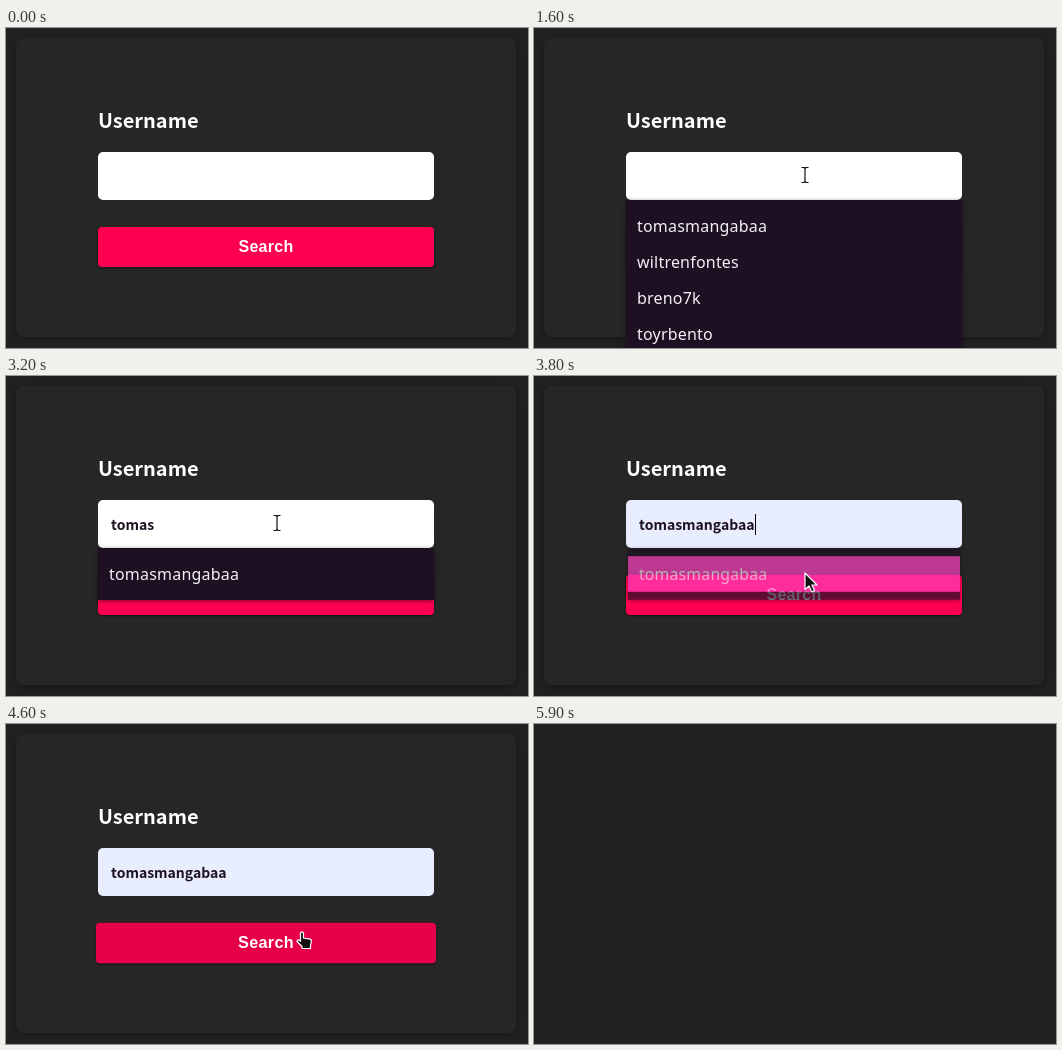
Animation of 522x320 px, one loop 6 s. Source, as an HTML page:

```html
<!DOCTYPE html>
<html lang="en">
<head>
<meta charset="utf-8">
<title>User search</title>
<style>
  html, body { margin: 0; width: 100%; height: 100%; overflow: hidden; background: #212121; }
  svg { display: block; }
  text { white-space: pre; }
  .card { fill: #262626; filter: drop-shadow(0 2px 4px rgba(0, 0, 0, .3)); }
  .label, .value { font-family: "Noto Sans CJK JP", "Noto Sans CJK SC", "Noto Sans", sans-serif; font-weight: 700; }
  .label { font-size: 20px; fill: #fff; }
  .value { font-size: 14px; fill: #1c1022; }
  .search { font: 700 16px "Liberation Sans", Arial, sans-serif; letter-spacing: .3px; fill: #fff; text-anchor: middle; }
  .item { font: 500 16px "Noto Sans", "Open Sans", sans-serif; letter-spacing: .2px; fill: #f4f0f6; }
  #button, #list { transform-box: fill-box; transform-origin: center; }
  #button rect { filter: drop-shadow(0 1px 1px rgba(0, 0, 0, .45)); }
  #panel { fill: #1c1022; filter: drop-shadow(0 1px 2px rgba(0, 0, 0, .5)); }
</style>
</head>
<body>
<svg width="522" height="320" viewBox="0 0 522 320">
  <g id="page">
    <rect class="card" x="10" y="10" width="500" height="299" rx="8"/>
    <text class="label" x="92" y="100">Username</text>
    <rect id="input" x="92" y="124" width="336" height="48" rx="5"/>
    <text id="value" class="value" x="105" y="154"></text>
    <rect id="caret" y="138" width="1" height="21" fill="#000"/>
    <g id="button">
      <rect id="face" x="92" y="199" width="336" height="40" rx="4"/>
      <text id="caption" class="search" x="260" y="224">Search</text>
    </g>
    <circle id="spinner" cx="260" cy="219" r="14.25" fill="none" stroke="#fff" stroke-width="4.5"
            pathLength="4" stroke-dasharray="3 1"/>
    <g id="list">
      <rect id="panel" x="92" y="172" width="336"/>
      <rect id="mark" x="92" y="180" width="336" height="36" fill="#ff40c0"/>
    </g>
    <g id="pointer" stroke-linejoin="round">
      <path id="arrow" d="M0 0V16.5L4 13L6.8 19L9.6 17.7L6.9 12H12Z" fill="#111" stroke="#fff" stroke-width="1.2"/>
      <g id="beam" fill="none">
        <path d="M-3.5 -7.5H-1L0 -6.5L1 -7.5H3.5M0 -6.5V6.5M-3.5 7.5H-1L0 6.5L1 7.5H3.5" stroke="#fff" stroke-width="3"/>
        <path d="M-3.5 -7.5H-1L0 -6.5L1 -7.5H3.5M0 -6.5V6.5M-3.5 7.5H-1L0 6.5L1 7.5H3.5" stroke="#111" stroke-width="1.2"/>
      </g>
      <path id="hand" d="M-1.5 1Q0 -1.2 1.5 1V6L8 7.2Q9.5 7.6 9.4 9L8.5 13.5V16.5H0V14.5L-5 9.5Q-5 7.6 -3.2 8L-1.5 9.3Z"
            fill="#111" stroke="#fff" stroke-width="1.2"/>
    </g>
  </g>
</svg>
<script>
const LOOP = 6000, STEP = 100;
const users = ["tomasmangabaa", "wiltrenfontes", "breno7k", "toyrbento"];
const typing = [[0, 0], [1900, 1], [2000, 2], [2200, 3], [2500, 4], [2600, 5], [3400, 13]];
const route = [
  [100, 512, 34], [400, 378, 88], [700, 271, 147], [3200, 271, 147], [3600, 271, 197],
  [3800, 271, 197], [4100, 290, 81], [4400, 296, 208]
];
const opening = [[900, 0], [1400, 1], [3700, 1], [4030, 0]];
const growth = [[4200, 1], [4400, 1.012], [4600, 1.012], [4800, 1.048], [4900, 1]];

const $ = id => document.getElementById(id);
const set = (id, attrs) => { for (const k in attrs) $(id).setAttribute(k, attrs[k]); };
const show = (id, on) => { $(id).style.display = on ? "" : "none"; };
const within = (t, a, b) => t >= a && t < b;

// Linear value of column c in rows of [time, ...values]
function at(rows, t, c = 1) {
  const i = rows.findIndex(r => r[0] > t);
  if (i < 0) return rows[rows.length - 1][c];
  if (i === 0) return rows[0][c];
  const [a, b] = [rows[i - 1], rows[i]];
  return a[c] + (b[c] - a[c]) * (t - a[0]) / (b[0] - a[0]);
}

const items = users.map(name => {
  const el = document.createElementNS("http://www.w3.org/2000/svg", "text");
  el.setAttribute("class", "item");
  el.setAttribute("x", 103);
  el.textContent = name;
  $("list").append(el);
  return el;
});

function drawInput(t) {
  const count = typing.filter(r => r[0] <= t).pop()[1];
  const typed = users[0].slice(0, count);
  $("value").textContent = typed;
  set("input", { fill: t >= 3400 ? "#e8eefd" : "#fff" });
  set("caret", { x: 105 + (typed ? Math.round($("value").getComputedTextLength()) : 0) });
  show("caret", within(t, 1000, 1600) || within(t, 1900, 3200) || within(t, 3700, 4200));
  return typed;
}

function drawList(t, typed) {
  const open = at(opening, t);
  let rows = 0;
  for (const el of items) {
    const match = el.textContent.startsWith(typed);
    el.style.display = match ? "" : "none";
    if (match) el.setAttribute("y", 204 + 36 * rows++);
  }
  set("panel", { height: 16 + 36 * rows });
  show("mark", t >= 3400);
  show("list", open > 0);
  $("list").style.opacity = open;
  $("list").style.transform = `scale(${0.96 + 0.04 * open})`;
}

function drawButton(t) {
  const busy = t >= 4900;
  set("face", { fill: within(t, 4300, 4900) ? "#e6004a" : "#ff0050" });
  $("button").style.transform = `scale(${at(growth, t)})`;
  show("caption", !busy);
  show("spinner", busy);
  set("spinner", { transform: `rotate(${(t - 5100) * 0.36} 260 219)` });
}

function drawPointer(t) {
  const x = at(route, t), y = at(route, t, 2);
  const inInput = x < 428 && y >= 124 && y < 172;
  const onButton = t >= 4300;
  show("pointer", within(t, 100, 4900));
  set("pointer", { transform: `translate(${x} ${y})` });
  show("beam", inInput && !onButton);
  show("hand", onButton);
  show("arrow", !inInput && !onButton);
}

function draw(t) {
  show("page", t < 5900);
  drawList(t, drawInput(t));
  drawButton(t);
  drawPointer(t);
}

const start = performance.now();
function tick() {
  const t = (performance.now() - start) % LOOP;
  draw(Math.floor(t / STEP) * STEP);
  requestAnimationFrame(tick);
}
tick();
</script>
</body>
</html>
```
